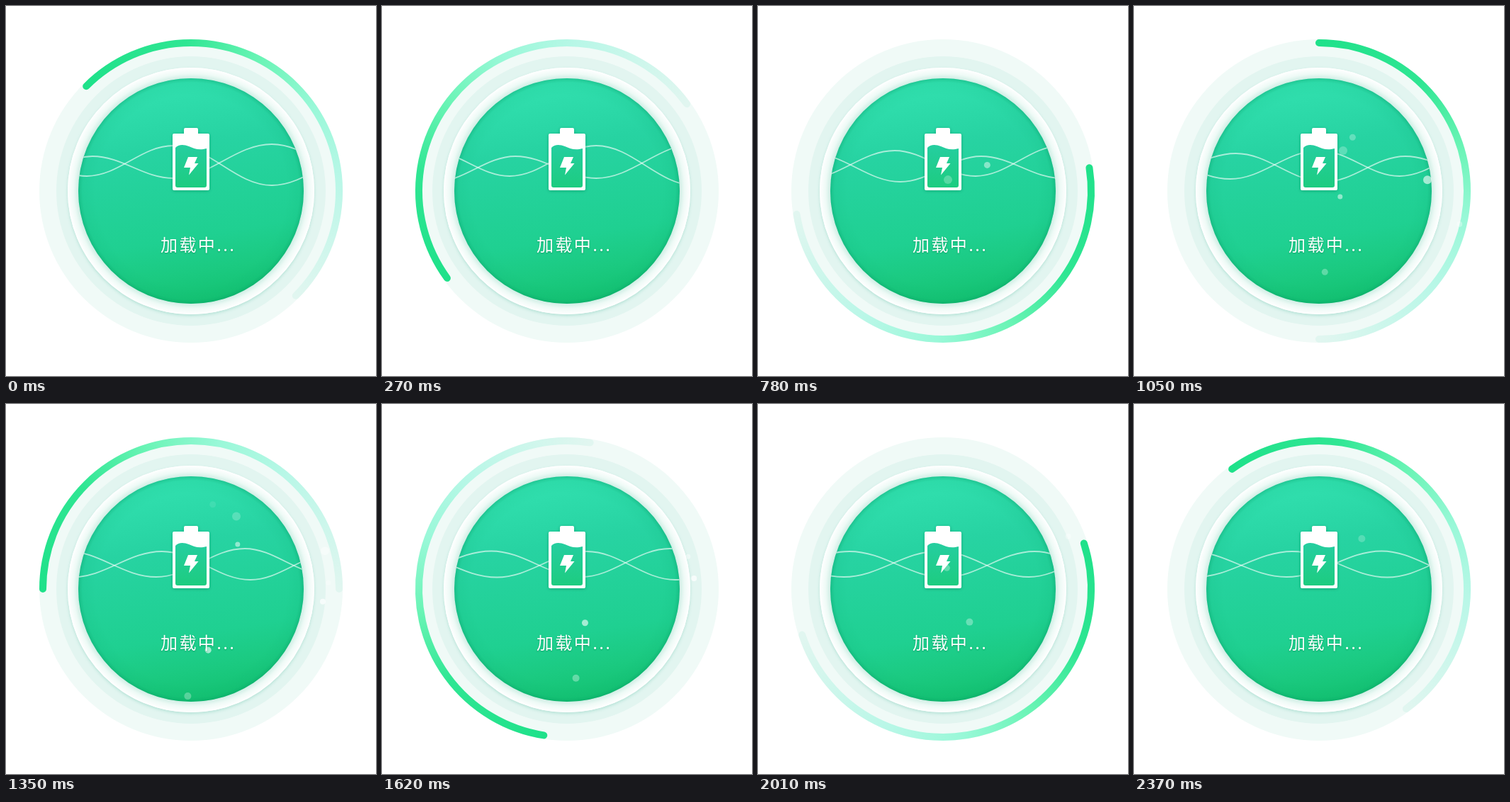
These frames come from a looping animation (522x522 px, 2.4 s). An HTML page with a canvas:

```html
<!DOCTYPE html>
<html lang="zh">
<head>
<meta charset="utf-8">
<style>
  html, body { margin: 0; width: 100%; height: 100%; overflow: hidden; background: #fff; }
  canvas { display: block; }
  p {
    position: absolute; left: 218px; top: 318px; margin: 0; white-space: nowrap;
    font: 500 24px/36px "Noto Sans CJK SC", "Noto Sans CJK", sans-serif; letter-spacing: 2.4px;
    color: #fff; text-shadow: 0 1px 2px rgba(0, 120, 70, .5);
  }
</style>
</head>
<body>
<canvas id="stage" width="522" height="522"></canvas>
<p>加载中...</p>
<script>
const ctx = document.getElementById('stage').getContext('2d');
const LOOP = 2400, STEP = 30, C = 261, TAU = Math.PI * 2;

// Humps of the drifting pair of strands: x and amplitude.
const humps = [[510, 19], [375, 29], [236, 23], [118, 14], [4, 22], [-121, 18], [-248, 18.5], [-382, 18], [-518, 18]];

// radius, opacity, start, end, fade-out time, x, y, velocity x, y, acceleration x, y
const bubbles = [
  [4.5, .6, 300, 1500, 960, 350, 294, -.0555, -.145],
  [6, .25, 340, 1560, 240, 224, 312, .1, -.152],
  [3.5, .5, 810, 1590, 240, 262, 326, .12, -.237],
  [6, .6, 800, 1540, 300, 384, 277, .12, -.127],
  [4.5, .6, 930, 2250, 480, 258.6, 382.3, .099, -.048, -8.5e-5, -8.5e-5],
  [5, .33, 1140, 2610, 360, 243, 415.2, .0637, .0199, 0, -1.65e-4],
  [4, .7, 930, 2190, 360, 465.5, 317, -.056, -.072, 2.8e-5, -4.5e-5],
  [3.5, .4, 1170, 1860, 240, 470, 277, -.085, -.137]
];

// Stops are written as "position color" pairs.
function gradient(g, stops) {
  for (const stop of stops.split(' ')) {
    const [at, color] = stop.split('#');
    g.addColorStop(+at, '#' + color);
  }
  return g;
}
const linear = (x0, y0, x1, y1, stops) => gradient(ctx.createLinearGradient(x0, y0, x1, y1), stops);
const radial = (r0, r1, stops) => gradient(ctx.createRadialGradient(C, C, r0, C, C, r1), stops);

function circle(x, y, r, fill) {
  ctx.beginPath();
  ctx.arc(x, y, r, 0, TAU);
  ctx.fillStyle = fill;
  ctx.fill();
}

function shadow(color, blur, dy) {
  ctx.shadowColor = color;
  ctx.shadowBlur = blur;
  ctx.shadowOffsetY = dy;
}

function drawArc(t) {
  const head = (225 - .3 * t) * Math.PI / 180;
  ctx.beginPath();
  ctx.arc(C, C, 209, head, head + Math.PI);
  ctx.lineWidth = 10;
  ctx.lineCap = 'round';
  ctx.strokeStyle = gradient(ctx.createConicGradient(head, C, C),
    '0#1fe18a .12#2fe693 .2#69f4b5 .28#99f8d8 .36#b8f7e7 .5#e1f6f0 .75#e1f6f0 .75#1fe18a 1#1fe18a');
  ctx.stroke();
}

function drawDisc() {
  ctx.save();
  shadow('rgba(0,150,110,.2)', 4, 2);
  circle(C, C, 174, '#fff');
  ctx.restore();
  circle(C, C, 174, radial(159, 174, '0#d0eee5 .45#eefaf6 1#ffffff'));
  circle(C, C, 159, linear(235, 102, 290, 420, '0#32e1b0 .3#27d3a2 .7#1fd091 .85#1bca81 1#13c170'));
  circle(C, C, 159, radial(135, 159, '0#00a06400 .75#00a06414 1#00965f59'));
}

function drawStrands(t) {
  const shift = .244 * t + 4.1e-6 * t * t;
  ctx.save();
  ctx.beginPath();
  ctx.arc(C, C, 159, 0, TAU);
  ctx.clip();
  ctx.lineWidth = 1.8;
  ctx.strokeStyle = 'rgba(255,255,255,.6)';
  for (const side of [1, -1]) {
    let px, py;
    ctx.beginPath();
    humps.forEach(([u, amp], i) => {
      const x = u + shift + (i > 2 ? 4 * side : 0);
      const y = (i > 2 ? 226 : i > 1 ? 220 : 224) + (i % 2 ? -amp : amp) * side;
      if (i) {
        const pull = (px - x) * .37;
        ctx.bezierCurveTo(px - pull, py, x + pull, y, x, y);
      } else ctx.moveTo(x, y);
      [px, py] = [x, y];
    });
    ctx.stroke();
  }
  ctx.restore();
}

function drawBattery() {
  ctx.save();
  shadow('rgba(0,130,85,.5)', 5, 1);
  ctx.fillStyle = '#fff';
  ctx.beginPath();
  ctx.roundRect(235, 180, 52, 80, 2);
  ctx.roundRect(251, 172, 20, 12, 2);
  ctx.fill();
  ctx.restore();
  ctx.fillStyle = linear(0, 196, 0, 256, '0#25cea0 1#1dcc80');
  ctx.fill(new Path2D('M239 200C243 195 251 195 258 198S272 204 283 201V253Q283 256 280 256H242Q239 256 239 253Z'));
  ctx.fillStyle = '#fff';
  ctx.fill(new Path2D('M257 213H270L266 222H271.5L258 238.5L260 228H251Z'));
}

function drawBubbles(t) {
  for (const [r, opacity, start, end, fade, x, y, vx, vy, ax = 0, ay = 0] of bubbles) {
    if (t < start || t > end) continue;
    const age = t - start;
    const alpha = opacity * Math.min(1, age / 240, (end - t) / fade);
    circle(x + (vx + ax * age) * age, y + (vy + ay * age) * age, r, `rgba(255,255,255,${alpha.toFixed(3)})`);
  }
}

function frame(now) {
  const t = Math.floor(now % LOOP / STEP) * STEP;
  ctx.fillStyle = '#fff';
  ctx.fillRect(0, 0, 522, 522);
  circle(C, C, 214, '#f0faf7');
  drawArc(t);
  circle(C, C, 190, '#e2f5f0');
  drawDisc();
  drawStrands(t);
  drawBattery();
  drawBubbles(t);
  requestAnimationFrame(frame);
}
frame(performance.now());
</script>
</body>
</html>
```
